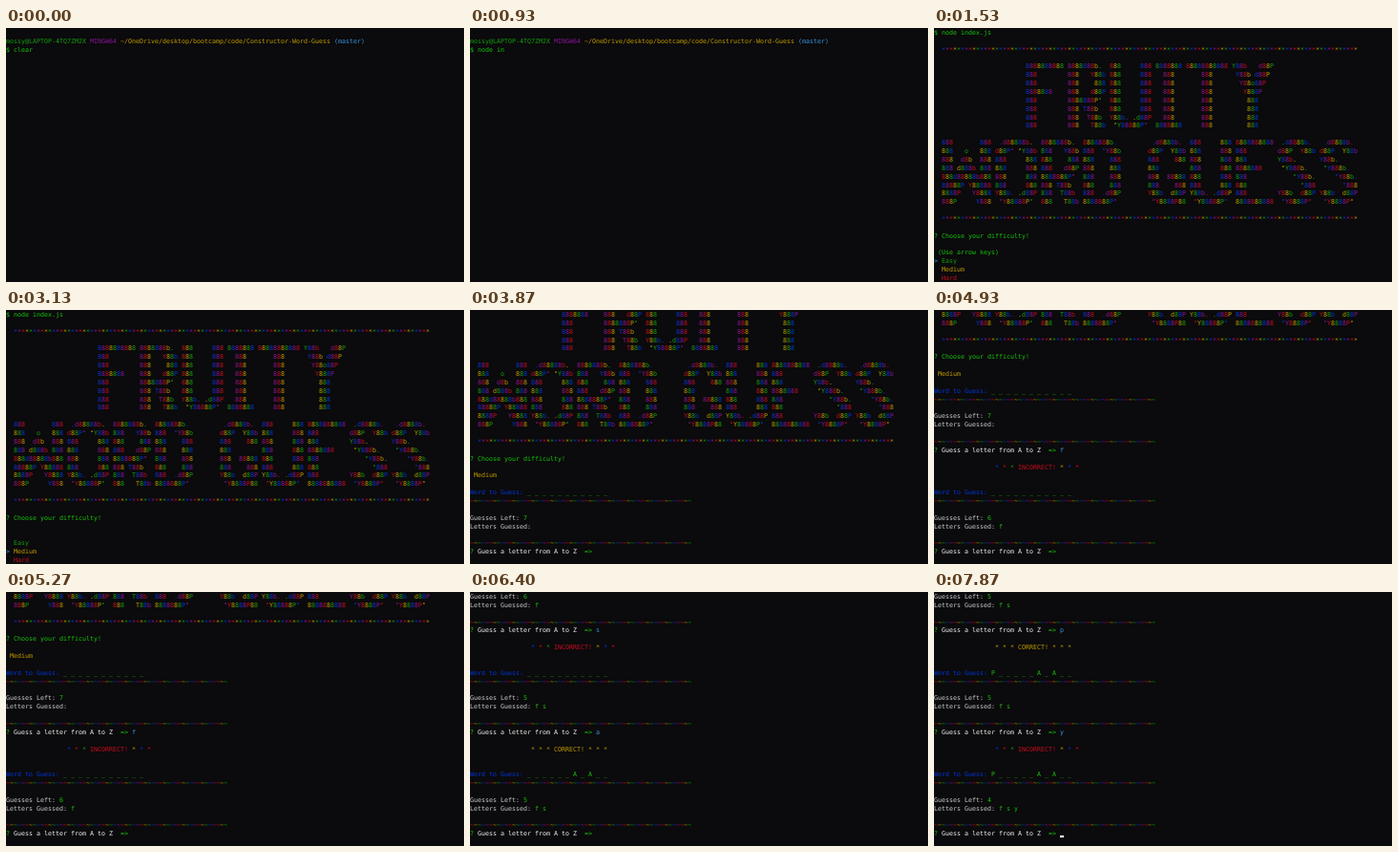
An HTML page with a canvas for the animation above (8 s loop, 480 px wide and 266 px high).

```html
<!DOCTYPE html>
<html lang="en">
<head>
<meta charset="utf-8">
<title>Fruity Word Guess</title>
<style>
  html, body { margin: 0; width: 100%; height: 100%; overflow: hidden; background: #0b0a0c; }
  canvas { display: block; width: 480px; height: 266px; }
</style>
</head>
<body>
<canvas id="screen"></canvas>
<script>
const LOOP = 8000, WIDTH = 480, HEIGHT = 266;
const ROWS = 30, CELL_W = 4, CELL_H = HEIGHT / ROWS, BASELINE = 6.9;

const C = {
  red: '#c50f1f', yellow: '#c19c00', green: '#13a10e', blue: '#0037da', magenta: '#881798',
  cyan: '#3a96dd', lime: '#16c60c', white: '#cccccc', bright: '#f2f2f2'
};
const RAINBOW = [C.red, C.yellow, C.green, C.blue, C.magenta];

const repeat = (row, n) => Array(n).fill(row);
const GLYPHS = {
  F: ['8888888888', '888', '888', '8888888', ...repeat('888', 4)],
  R: ['8888888b.', '888   Y88b', '888    888', '888   d88P', '8888888P"', '888 T88b', '888  T88b', '888   T88b'],
  U: [...repeat('888     888', 6), 'Y88b. .d88P', ' "Y88888P"'],
  I: ['8888888', ...repeat('  888', 6), '8888888'],
  T: ['88888888888', ...repeat('    888', 7)],
  Y: ['Y88b   d88P', ' Y88b d88P', '  Y88o88P', '   Y888P', ...repeat('    888', 4)],
  W: ['888       888', '888   o   888', '888  d8b  888', '888 d888b 888',
      '888d88888b888', '88888P Y88888', '8888P   Y8888', '888P     Y888'],
  O: [' .d88888b.', 'd88P" "Y88b', ...repeat('888     888', 4), 'Y88b. .d88P', ' "Y88888P"'],
  D: ['8888888b.', '888  "Y88b', ...repeat('888    888', 4), '888  .d88P', '8888888P"'],
  G: [' .d8888b.', 'd88P  Y88b', '888    888', '888', '888  88888', '888    888', 'Y88b  d88P', ' "Y8888P88'],
  E: ['8888888888', '888', '888', '8888888', '888', '888', '888', '8888888888'],
  S: [' .d8888b.', 'd88P  Y88b', 'Y88b.', ' "Y888b.', '    "Y88b.', '      "888', 'Y88b  d88P', ' "Y8888P"'],
  ' ': repeat('     ', 8)
};

const bigText = (text, indent) => repeat(indent, 8).map((start, row) =>
  start + [...text].map(ch => {
    const width = Math.max(...GLYPHS[ch].map(r => r.length)) + 1;
    return GLYPHS[ch][row].padEnd(width);
  }).join(''));

// A line is a list of spans: [column, text, colour].
// The rainbow advances on every character, including tabs and newlines.
function rainbow(text, col = 0) {
  const lines = [[]];
  [...text].forEach((ch, i) => {
    if (ch === '\n') {
      lines.push([]);
      col = 0;
    } else if (ch === '\t') {
      col += 8 - col % 8;
    } else {
      lines[lines.length - 1].push([col++, ch, RAINBOW[i % 5]]);
    }
  });
  return lines;
}

const STARS = '  ' + '*'.repeat(109);
const [WAVES] = rainbow('~'.repeat(58));
const TITLE = [...bigText('FRUITY', '\t\t\t'), '', ...bigText('WORD GUESS', '  '), '', STARS].join('\n');
const BANNER = [...rainbow('\n' + STARS), [], ...rainbow(TITLE), []];
const SHELL = [
  [0, 'mossy@LAPTOP-4TQ7ZM2X', C.green], [22, 'MINGW64', C.magenta],
  [30, '~/OneDrive/desktop/bootcamp/code/Constructor-Word-Guess', C.yellow], [86, '(master)', C.cyan]
];

const ANSWER = 'POMEGRANATE', COMMAND = 'node index.js';
const CLEAR_AT = 330, TYPE_AT = 560, KEY_MS = 50, RUN_AT = 1330, MOVE_AT = 2300, CHOOSE_AT = 3700;
const GUESSES = [['f', 4800], ['s', 5600], ['a', 6250], ['p', 7000], ['y', 7730]];
const TYPED_BEFORE = 200;

function verdict(correct) {
  if (correct) return [[16, '* * * CORRECT! * * *', C.yellow]];
  const [, left] = rainbow('\n\t\t* * *');
  const [right] = rainbow(' * * *', 32);
  return [...left, [22, 'INCORRECT!', C.red], ...right];
}

function status(found, wrong) {
  const word = [...ANSWER].map(ch => found.includes(ch) ? ch : '_').join(' ');
  return [
    [[0, 'Word to Guess:', C.blue], [15, word, C.lime]],
    WAVES, [],
    [[0, 'Guesses Left:', C.white], [14, String(7 - wrong.length), C.lime]],
    [[0, 'Letters Guessed:', C.white], [17, wrong.join(' '), C.lime]],
    [], WAVES
  ];
}

function menu(moved) {
  const options = [['Easy', C.green], ['Medium', C.yellow], ['Hard', C.red]];
  const hint = moved ? [] : [[1, '(Use arrow keys)', C.lime]];
  return [hint, ...options.map(([label, color], i) =>
    [[0, i === Number(moved) ? '>' : ' ', C.cyan], [2, label, color]])];
}

// Returns all lines printed so far and the cursor position, if any
function session(t) {
  const lines = [[], SHELL];
  const keys = Math.max(0, Math.floor((t - TYPE_AT) / KEY_MS));
  const input = t < CLEAR_AT ? 'clear' : COMMAND.slice(0, keys);
  lines.push([[0, '$ ' + input, C.lime]]);
  if (t < RUN_AT) return { lines, cursor: [2 + input.length, 2] };

  lines.push(...BANNER, [[0, '? Choose your difficulty!', C.lime]], []);
  if (t < CHOOSE_AT) {
    lines.push(...menu(t >= MOVE_AT));
    return { lines };
  }

  lines.push([[1, 'Medium', C.yellow]], []);
  const found = [], wrong = [];
  for (let i = 0; ; i++) {
    const [letter, enterAt] = GUESSES[i] || ['', Infinity];
    const entered = t >= enterAt, typed = t >= enterAt - TYPED_BEFORE ? letter : '';
    lines.push(...status(found, wrong), [
      [0, '?', C.lime], [2, 'Guess a letter from A to Z', C.bright], [30, '=>', C.lime],
      [33, typed, entered ? C.cyan : C.white]
    ], []);
    if (!entered) return { lines, cursor: [33 + typed.length, lines.length - 2] };
    const correct = ANSWER.includes(letter.toUpperCase());
    if (correct) found.push(letter.toUpperCase());
    else wrong.push(letter);
    lines.push(verdict(correct), [], []);
  }
}

const canvas = document.getElementById('screen');
const ctx = canvas.getContext('2d');
const ratio = window.devicePixelRatio || 1;
canvas.width = WIDTH * ratio;
canvas.height = HEIGHT * ratio;
ctx.scale(ratio, ratio);
ctx.font = '6.644px "DejaVu Sans Mono", monospace';

function drawSpan([col, text, color], y) {
  ctx.fillStyle = color;
  [...text].forEach((ch, i) => ctx.fillText(ch, (col + i) * CELL_W, y));
}

function draw(t) {
  ctx.fillStyle = '#0b0a0c';
  ctx.fillRect(0, 0, WIDTH, HEIGHT);
  const { lines, cursor } = session(t);
  const scroll = Math.max(0, lines.length - ROWS);
  lines.slice(scroll).forEach((line, row) =>
    line.forEach(span => drawSpan(span, row * CELL_H + BASELINE)));

  const blink = t % 1060;
  if (cursor && blink >= 100 && blink < 630) {
    ctx.fillStyle = C.bright;
    ctx.fillRect(cursor[0] * CELL_W, (cursor[1] - scroll + 1) * CELL_H - 2.2, CELL_W, 2.2);
  }
}

const start = performance.now();
function tick() {
  draw((performance.now() - start) % LOOP);
  requestAnimationFrame(tick);
}
tick();
</script>
</body>
</html>
```
